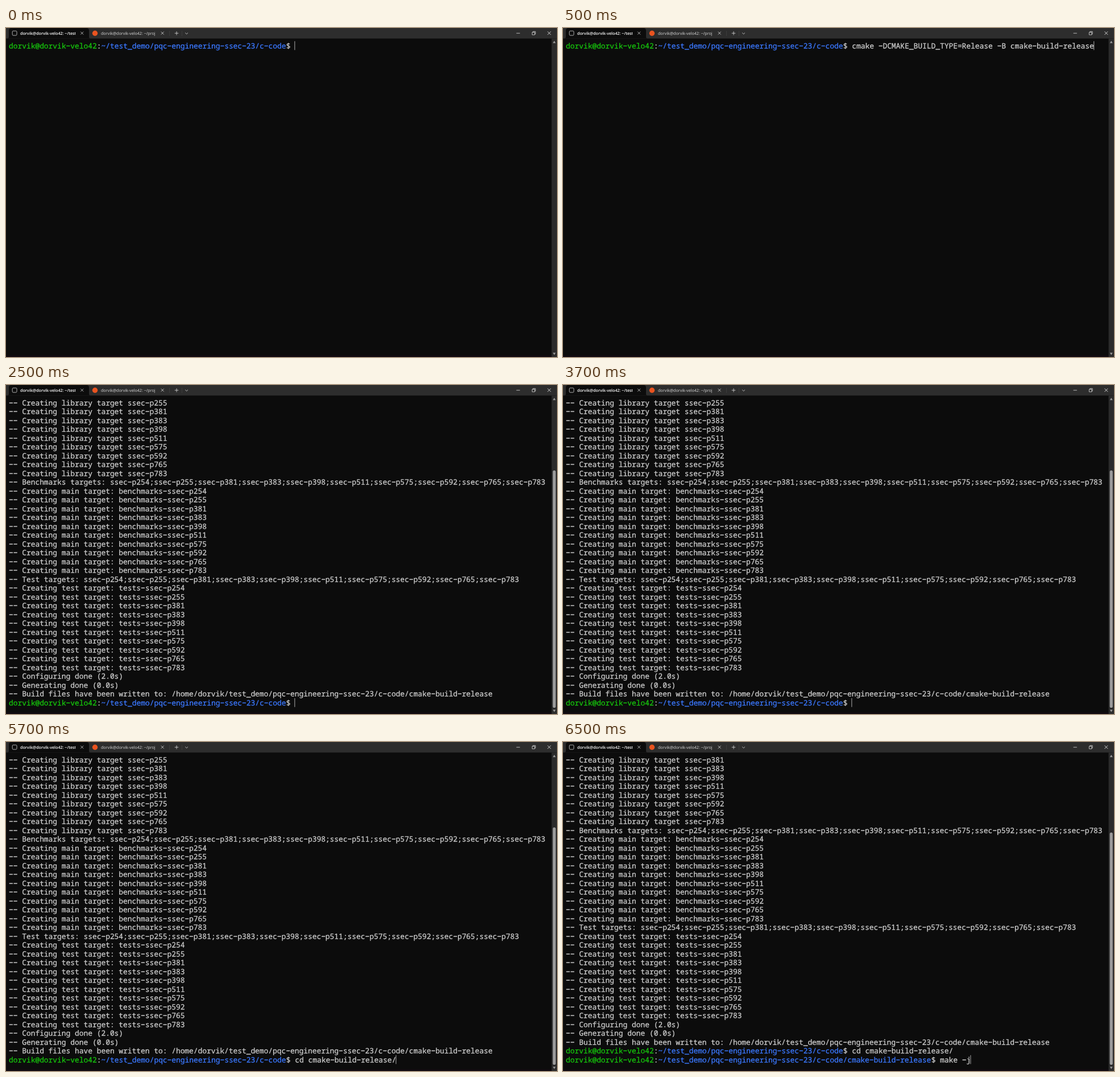
These frames come from a looping animation (969 by 578 pixels, 8000 ms). An HTML page:

```html
<!DOCTYPE html>
<html lang="en">
<head>
<meta charset="utf-8">
<title>Terminal build</title>
<style>
  html, body { margin: 0; width: 100%; height: 100%; overflow: hidden; background: #0c0c0c; }
  svg { display: block; width: 969px; height: 578px; }
  text { white-space: pre; text-rendering: geometricPrecision; }
  .term { font: 12.905px "Noto Sans Mono", "DejaVu Sans Mono", monospace; font-variant-ligatures: none; }
  .term text { color: #ccc; fill: currentColor; stroke: currentColor; stroke-width: .3; }
  .term .user { color: #16c60c; }
  .term .path { color: #3b78ff; }
  .tab { font: 7.13px "Open Sans", "Noto Sans", sans-serif; fill: #ddd; }
  .tab.active { font-weight: 600; fill: #fff; }
  .line { fill: none; stroke: #e4e4e4; stroke-width: .75; }
</style>
</head>
<body>
<svg viewBox="0 0 969 578" xmlns="http://www.w3.org/2000/svg">
  <defs>
    <clipPath id="tabClip"><rect x="20" y="0" width="102.3" height="18"/></clipPath>
    <path id="cross" d="M-2.5 -2.5L2.5 2.5M2.5 -2.5L-2.5 2.5"/>
  </defs>
  <rect width="969" height="578" fill="#0c0c0c"/>
  <rect y="575" width="960" height="3" fill="#110a10"/>

  <!-- title bar -->
  <rect width="969" height="18.5" fill="#2d2d2d"/>
  <path d="M2 18.5Q5 18.5 5 15.5V4.5Q5 0 9.5 0H141.5Q146 0 146 4.5V15.5Q146 18.5 149 18.5Z" fill="#0c0c0c"/>
  <rect class="line" x="11.2" y="5.2" width="7.8" height="7.8" rx="1.6"/>
  <text class="tab active" x="25" y="12" clip-path="url(#tabClip)">dorvik@dorvik-velo42: ~/test</text>
  <circle cx="156.5" cy="9.3" r="4.7" fill="#e95420"/>
  <text class="tab" x="167" y="12.2">dorvik@dorvik-velo42: ~/proj</text>
  <path d="M287.5 5V14M309.5 5V14" stroke="#3d3d3d"/>
  <g class="line">
    <use href="#cross" x="133.7" y="9"/>
    <use href="#cross" x="275.2" y="9"/>
    <path d="M296.7 9.2H303.3M300 5.9V12.5"/>
    <path d="M315.2 8.4L317.6 10.7L320 8.4"/>
    <path d="M897.5 9.2H903.8"/>
    <path d="M925.3 7.6H929.8V12H925.3ZM926.7 7.4V6.2H931.1V10.7H930"/>
    <use href="#cross" transform="translate(955.3 9) scale(1.15)"/>
  </g>

  <!-- scroll bar -->
  <rect x="959.5" y="18.5" width="9.5" height="559.5" fill="#2b2b2b"/>
  <path d="M961.7 26.5L964.2 22.5L966.7 26.5ZM961.7 570.5L964.2 574.5L966.7 570.5Z" fill="#9c9c9c"/>
  <rect id="thumb" x="961.6" width="5.2" rx="2.6" fill="#9c9c9c"/>

  <g id="screen" class="term"></g>
  <rect id="cursor" width="1" height="15.5" fill="#aaa"/>
</svg>
<script>
const LOOP = 8000;
const CELL = 7.743, ROW = 15.5, LEFT = 5, TOP = 23.2, BASE = 12.3;
const THUMB_END = 567;
const USER = "dorvik@dorvik-velo42";
const HOME = "~/test_demo/pqc-engineering-ssec-23/c-code";
const BUILD = "cmake-build-release";

const $ = id => document.getElementById(id);
const libs = [254, 255, 381, 383, 398, 511, 575, 592, 765, 783].map(n => "ssec-p" + n);
const list = prefix => libs.map(lib => prefix + lib);
const plain = text => [["", text]];
const prompt = (path, command = "") =>
  [["user", USER], ["", ":"], ["path", path], ["", "$ " + command]];

const output = [
  ...list("Creating library target ").slice(1),
  "Benchmarks targets: " + libs.join(";"),
  ...list("Creating main target: benchmarks-"),
  "Test targets: " + libs.join(";"),
  ...list("Creating test target: tests-"),
  "Configuring done (2.0s)",
  "Generating done (0.0s)",
  "Build files have been written to: /home/dorvik/test_demo/pqc-engineering-ssec-23/c-code/" + BUILD
].map(text => plain("-- " + text));

const enterBuild = prompt(HOME, `cd ${BUILD}/`);
const states = [
  { at: 0, rows: [prompt(HOME)] },
  { at: 500, rows: [prompt(HOME, "cmake -DCMAKE_BUILD_TYPE=Release -B " + BUILD)] },
  { at: 2500, rows: [...output, prompt(HOME)], thumb: 150 },
  { at: 4500, rows: [...output, enterBuild], thumb: 150 },
  { at: 6500, rows: [...output.slice(1), enterBuild, prompt(`${HOME}/${BUILD}`, "make -j")], thumb: 159 }
];

// The terminal face has wide, high hyphens: the minus glyph has that shape.
const wideHyphens = text => text.replaceAll("-", "\u2212");

function addText(name, text, column, row) {
  const node = document.createElementNS("http://www.w3.org/2000/svg", "text");
  node.setAttribute("class", name);
  node.setAttribute("x", LEFT + column * CELL);
  node.setAttribute("y", TOP + row * ROW + BASE);
  node.textContent = wideHyphens(text);
  $("screen").append(node);
}

function draw({ rows, thumb = THUMB_END }) {
  $("screen").replaceChildren();
  let column = 0;
  rows.forEach((parts, row) => {
    column = 0;
    for (const [name, text] of parts) {
      addText(name, text, column, row);
      column += text.length;
    }
  });
  $("cursor").setAttribute("x", LEFT + column * CELL - 1);
  $("cursor").setAttribute("y", TOP + (rows.length - 1) * ROW);
  $("thumb").setAttribute("y", thumb);
  $("thumb").setAttribute("height", THUMB_END - thumb);
}

let shown;
function update(now) {
  const time = now % LOOP;
  const state = states.findLast(s => s.at <= time);
  if (state !== shown) draw(shown = state);
}

const start = performance.now();
function tick() {
  update(performance.now() - start);
  requestAnimationFrame(tick);
}
tick();
</script>
</body>
</html>
```
